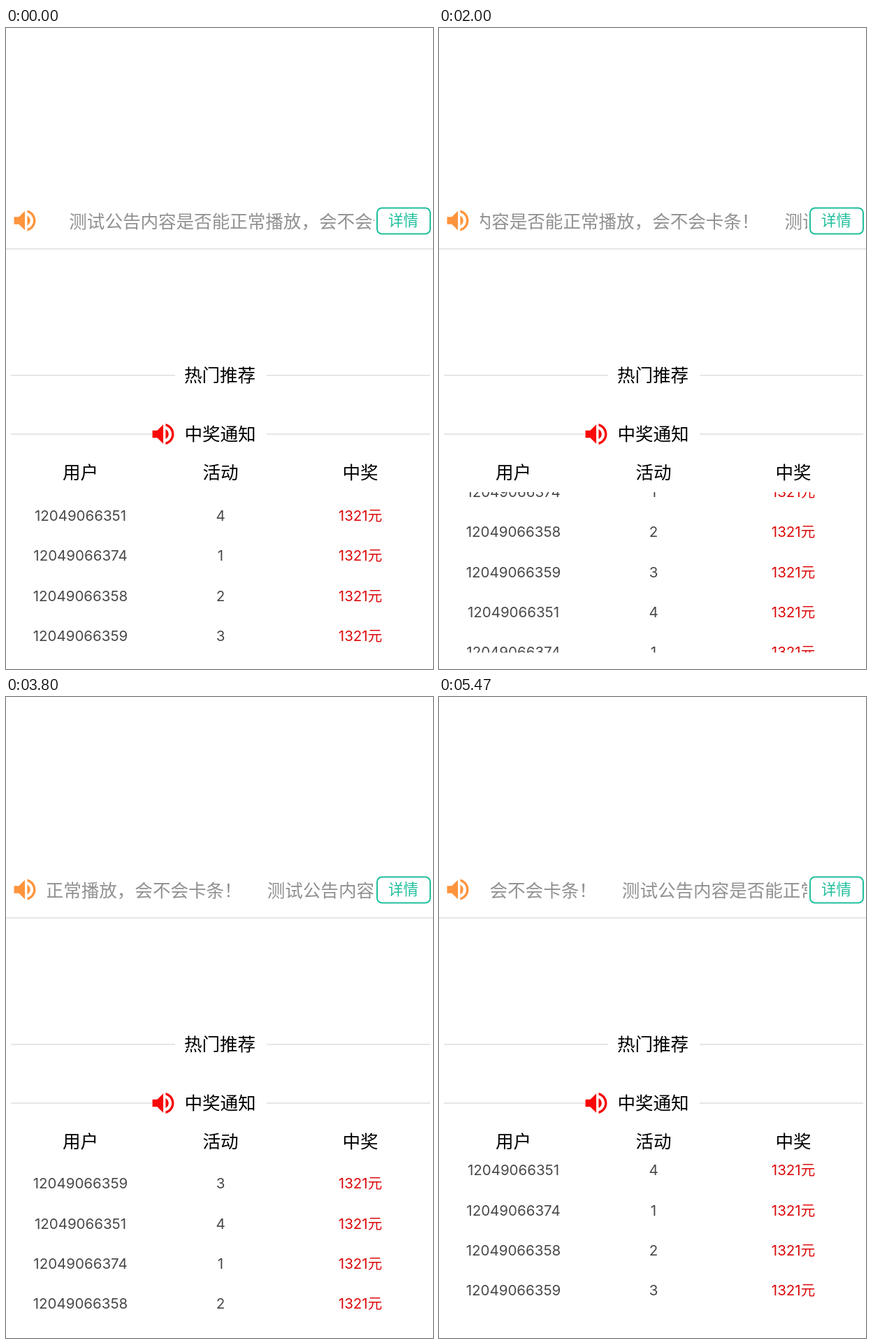
Write an HTML page that moves like this. It is 611 px wide and 917 px high and loops after 5.54 s.

```html
<!DOCTYPE html>
<html lang="zh-CN">
<head>
<meta charset="utf-8">
<style>
  html, body { margin: 0; width: 100%; height: 100%; overflow: hidden; background: #fff; }
  svg { display: block; width: 611px; height: 917px; }
  text { font: 25.55px "Noto Sans CJK SC", "Noto Sans CJK", sans-serif; white-space: pre; }
  .mid, .row text { text-anchor: middle; }
  .row text { font: 20.5px Inter, "Noto Sans CJK SC", "Noto Sans CJK", sans-serif; fill: #484848; }
  .row .prize { fill: #dc0a0a; }
  #ticker text { fill: #919191; }
  .rule { stroke: #dedede; stroke-width: 1.6; }
</style>
</head>
<body>
<svg viewBox="0 0 611 917">
  <defs>
    <path id="speaker" transform="scale(1.72) translate(-12 -12)" d="M3 9v6h4l5 5V4L7 9H3zm13.5 3c0-1.77-1.02-3.29-2.5-4.03v8.05c1.48-.73 2.5-2.25 2.5-4.02zM14 3.23v2.06c2.89.86 5 3.54 5 6.71s-2.11 5.85-5 6.71v2.06c4.01-.91 7-4.49 7-8.77s-2.99-7.86-7-8.77z"/>
    <clipPath id="tickerClip"><rect x="59" y="250" width="468" height="56"/></clipPath>
    <clipPath id="listClip"><rect y="664" width="611" height="229.5"/></clipPath>
  </defs>

  <use href="#speaker" x="27" y="275.5" fill="#ff943c"/>
  <g clip-path="url(#tickerClip)"><g id="ticker"></g></g>
  <rect x="531" y="257.5" width="76" height="37" rx="7" fill="none" stroke="#1fbf9c" stroke-width="2"/>
  <text class="mid" x="568.5" y="283.3" style="font-size:21.5px" fill="#1fbf9c">详情</text>

  <path class="rule" d="M0 316H611M7 497H242M373 497H607M7 581H209M373 581H607"/>
  <text class="mid" x="306" y="506.3">热门推荐</text>
  <use href="#speaker" x="225" y="581" fill="#f80808"/>
  <text class="mid" x="306.5" y="590.3">中奖通知</text>

  <text class="mid" x="106.5" y="645">用户</text>
  <text class="mid" x="307" y="645">活动</text>
  <text class="mid" x="507" y="645">中奖</text>
  <g clip-path="url(#listClip)"><g id="list"></g></g>
</svg>
<script>
const LOOP = 5540, STEP = 200 / 3, LAST_STEP = 82;
const NOTICE = '测试公告内容是否能正常播放，会不会卡条！';
const NOTICE_PERIOD = 547, ROW_HEIGHT = 57.3;
const USERS = [['12049066351', 4], ['12049066374', 1], ['12049066358', 2], ['12049066359', 3]];

const ticker = document.getElementById('ticker');
const list = document.getElementById('list');

ticker.innerHTML = [0, 1].map(i =>
  `<text x="${90.3 + i * NOTICE_PERIOD}" y="285.7">${NOTICE}</text>`).join('');

list.innerHTML = Array.from({ length: 9 }, (_, i) => {
  const [user, activity] = USERS[i % USERS.length];
  return `<g class="row" transform="translate(0 ${705 + i * ROW_HEIGHT})">
    <text x="106.5">${user}</text><text x="307">${activity}</text>
    <text class="prize" x="507">1321元</text></g>`;
}).join('');

// The ticker runs slightly faster at first, then settles to a constant speed.
const tickerShift = t => t < 870 ? t * 67 / 870 : 67 + (t - 870) * 0.0671;
const listShift = t => t * 0.0457;

function draw(now) {
  const step = Math.min(LAST_STEP, Math.floor((now % LOOP + 4) / STEP));
  const t = step * STEP;
  ticker.setAttribute('transform', `translate(${-tickerShift(t)} 0)`);
  list.setAttribute('transform', `translate(0 ${-listShift(t)})`);
}

const start = performance.now();
function tick() {
  draw(performance.now() - start);
  requestAnimationFrame(tick);
}
tick();
</script>
</body>
</html>
```
